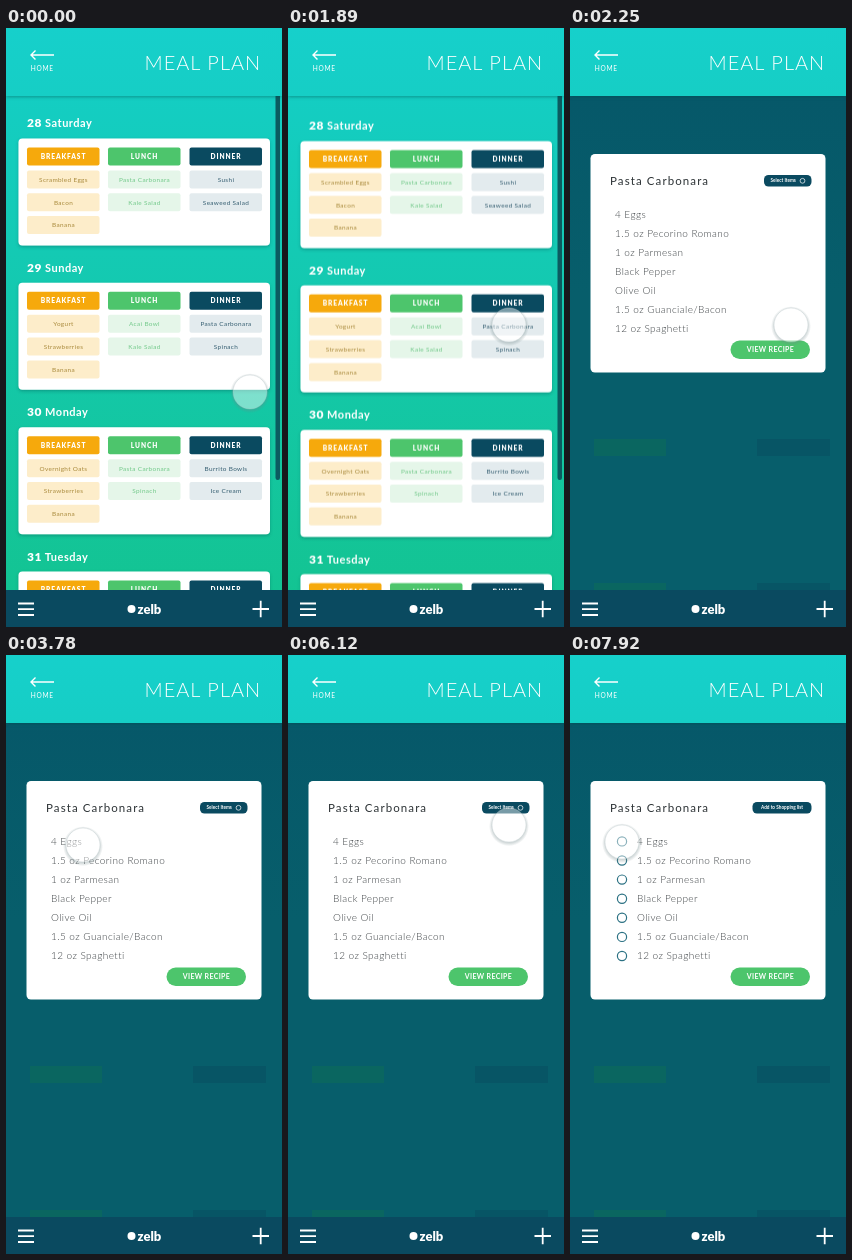
Write an HTML page that moves like this. It is 276 by 599 pixels and loops after 8000 ms.

```html
<!DOCTYPE html>
<html lang="en">
<head>
<meta charset="utf-8">
<title>Meal plan</title>
<style>
  html, body { margin: 0; width: 100%; height: 100%; overflow: hidden; background: #14cbb4; }
  svg { display: block; width: 100%; height: 100%; font-family: Lato, sans-serif; }
  .label { font-weight: 900; font-size: 6.6px; letter-spacing: .9px; }
  .dish { font-size: 6.4px; letter-spacing: .35px; }
  .day { font-size: 11px; font-weight: 700; letter-spacing: .5px; }
  .day .date { font-weight: 900; font-size: 12px; }
  .ingredient { font-size: 10px; font-weight: 300; letter-spacing: .42px; fill: #3c4144; }
  .tiny { font-size: 4.7px; font-weight: 700; }

  .list, .popup, .select, .add, .names, .checks, .cursor, .press {
    animation: 8s linear infinite both;
  }
  .list { animation-name: settle; }
  .popup { animation-name: open; }
  .select { animation-name: leave; }
  .add, .checks { animation-name: enter; }
  .names { animation-name: indent; }
  .cursor { animation-name: travel; animation-timing-function: ease-in-out; }
  .press { animation-name: press; }

  @keyframes settle {
    0% { transform: translateY(-2.6px); animation-timing-function: ease-out; }
    4.5%, 100% { transform: none; }
  }
  @keyframes open {
    0%, 25% { opacity: 0; }
    27.8%, 100% { opacity: 1; }
  }
  @keyframes leave {
    0%, 79% { opacity: 1; }
    82%, 100% { opacity: 0; }
  }
  @keyframes enter {
    0%, 79% { opacity: 0; }
    82%, 100% { opacity: 1; }
  }
  @keyframes indent {
    0%, 79% { transform: none; animation-timing-function: ease-in-out; }
    82.5%, 100% { transform: translateX(22px); }
  }
  @keyframes travel {
    0%, 15% { transform: translate(244px, 364px); }
    22.5%, 37% { transform: translate(221px, 297px); }
    46.5%, 50% { transform: translate(77px, 190px); }
    57% { transform: translate(72px, 288px); }
    64% { transform: translate(150px, 290px); }
    74%, 85% { transform: translate(221px, 170px); }
    95%, 100% { transform: translate(52px, 187px); }
  }
  @keyframes press {
    0%, 23.7%, 26.5%, 76.8%, 79.4%, 100% { transform: none; }
    25%, 78% { transform: scale(.85); }
  }
</style>
</head>
<body>
<svg viewBox="0 0 276 599">
  <defs>
    <linearGradient id="backdrop" x2="0" y2="1">
      <stop stop-color="#14cfc9"/>
      <stop offset=".45" stop-color="#14c9af"/>
      <stop offset="1" stop-color="#13c38f"/>
    </linearGradient>
    <linearGradient id="bar" x2="0" y2="1">
      <stop stop-color="#13d0cb"/>
      <stop offset="1" stop-color="#14cec5"/>
    </linearGradient>
    <linearGradient id="shade" x2="0" y2="1">
      <stop stop-color="#065869"/>
      <stop offset=".4" stop-color="#075e6b"/>
    </linearGradient>
    <radialGradient id="halo">
      <stop offset=".84" stop-color="#6f8688" stop-opacity=".3"/>
      <stop offset="1" stop-color="#6f8688" stop-opacity="0"/>
    </radialGradient>
    <filter id="soft" x="-20%" y="-20%" width="140%" height="150%">
      <feDropShadow dx="0" dy="1.5" stdDeviation="1.8" flood-color="#034a4a" flood-opacity=".35"/>
    </filter>
    <mask id="rim">
      <rect x="-25" y="-25" width="50" height="50" fill="#fff"/>
      <circle r="17" fill="#000"/>
    </mask>
  </defs>

  <rect width="276" height="599" fill="url(#backdrop)"/>
  <g class="list" id="list"></g>
  <rect x="269.5" y="2" width="4.5" height="450" rx="2.2" fill="#0b5b60"/>

  <g class="popup">
    <rect y="67" width="276" height="496" fill="url(#shade)"/>
    <path d="M24 411h72v17h-72zM24 555h72v8h-72z" fill="#0a6660"/>
    <path d="M187 411h73v17h-73zM187 555h73v8h-73z" fill="#075565"/>
    <rect x="20.5" y="126" width="235" height="218.5" rx="4.5" fill="#fff"/>
    <text x="40" y="157" font-size="11.5" letter-spacing="1.1" fill="#2d3336">Pasta Carbonara</text>
    <g class="select">
      <rect x="194" y="147" width="47.5" height="11.5" rx="4.5" fill="#0a4a60"/>
      <text class="tiny" x="200.5" y="154.4" fill="#fff">Select Items</text>
      <circle cx="232.5" cy="152.8" r="2.4" fill="none" stroke="#fff" stroke-width=".7"/>
    </g>
    <g class="add">
      <rect x="182.5" y="147" width="59" height="11.5" rx="4.5" fill="#0a4a60"/>
      <text class="tiny" x="212" y="154.4" fill="#fff" text-anchor="middle">Add to Shopping list</text>
    </g>
    <g class="names" id="names"></g>
    <g class="checks" id="checks" fill="#fff" stroke="#2b7183" stroke-width="1.2"></g>
    <rect x="160.5" y="312.5" width="79.5" height="18.5" rx="9.2" fill="#4dc56c"/>
    <text x="200.5" y="324.3" font-size="7" font-weight="700" letter-spacing=".35" fill="#fff" text-anchor="middle">VIEW RECIPE</text>
  </g>

  <g fill="#fff">
    <rect width="276" height="68" fill="url(#bar)" filter="url(#soft)"/>
    <path d="M48 27H25M29.5 22.5L25 27l4.5 4.5" fill="none" stroke="#fff" stroke-width="1.4"/>
    <text x="36.3" y="42.5" font-size="6.6" letter-spacing=".7" text-anchor="middle">HOME</text>
    <text x="138.5" y="41.8" font-size="20" font-weight="300" letter-spacing="1">MEAL PLAN</text>
    <rect y="562" width="276" height="37" fill="#0a4a60"/>
    <path d="M12 575.5h16M12 581.2h16M12 587h16M246.5 581h16.5M254.7 572.8v16.5" stroke="#fff" stroke-width="1.8"/>
    <circle cx="125.5" cy="581" r="4"/>
    <text x="131.5" y="585.7" font-size="13" font-weight="900">zelb</text>
  </g>

  <g class="cursor">
    <g class="press">
      <circle cy="1.2" r="20" fill="url(#halo)" mask="url(#rim)"/>
      <circle r="17" fill="#fff" fill-opacity=".45" stroke="#b4c2c3" stroke-opacity=".45" stroke-width=".8"/>
    </g>
  </g>
</svg>
<script>
  const meals = [
    { name: "BREAKFAST", x: 21, main: "#f6a90c", pale: "#fdedca", ink: "#a98a3c" },
    { name: "LUNCH", x: 102, main: "#4dc56c", pale: "#e5f6e9", ink: "#72c98a" },
    { name: "DINNER", x: 183.5, main: "#0a4a60", pale: "#e3ebee", ink: "#355e71" }
  ];
  const days = [
    ["28", "Saturday", "Scrambled Eggs,Bacon,Banana", "Pasta Carbonara,Kale Salad", "Sushi,Seaweed Salad"],
    ["29", "Sunday", "Yogurt,Strawberries,Banana", "Acai Bowl,Kale Salad", "Pasta Carbonara,Spinach"],
    ["30", "Monday", "Overnight Oats,Strawberries,Banana", "Pasta Carbonara,Spinach", "Burrito Bowls,Ice Cream"],
    ["31", "Tuesday", "", "", ""]
  ];
  const ingredients = ["4 Eggs", "1.5 oz Pecorino Romano", "1 oz Parmesan", "Black Pepper",
    "Olive Oil", "1.5 oz Guanciale/Bacon", "12 oz Spaghetti"];

  const chip = (x, y, fill, ink, style, text) =>
    `<rect x="${x}" y="${y}" width="72.5" height="18" rx="2" fill="${fill}"/>
     <text class="${style}" x="${x + 36.5}" y="${y + 11.3}" fill="${ink}" text-anchor="middle">${text}</text>`;

  const column = (meal, dishes) =>
    chip(meal.x, 122, meal.main, "#fff", "label", meal.name) +
    dishes.split(",").filter(Boolean).map((dish, i) =>
      chip(meal.x, 145 + i * 22.8, meal.pale, meal.ink, "dish", dish)).join("");

  const fill = (id, items, draw) =>
    document.getElementById(id).innerHTML = items.map(draw).join("");

  fill("list", days, ([date, weekday, ...dishes], i) =>
    `<g transform="translate(0 ${i * 144.4})">
      <text class="day" x="21" y="102" fill="#fff"><tspan class="date">${date}</tspan> ${weekday}</text>
      <rect x="12.5" y="113" width="251.5" height="107" rx="4" fill="#fff" filter="url(#soft)"/>
      ${meals.map((meal, k) => column(meal, dishes[k])).join("")}
    </g>`);

  const rowY = i => 186.4 + i * 19.1;
  fill("names", ingredients, (name, i) => `<text class="ingredient" x="45" y="${rowY(i) + 3.4}">${name}</text>`);
  fill("checks", ingredients, (_, i) => `<circle cx="52" cy="${rowY(i)}" r="4.6"/>`);
</script>
</body>
</html>
```
